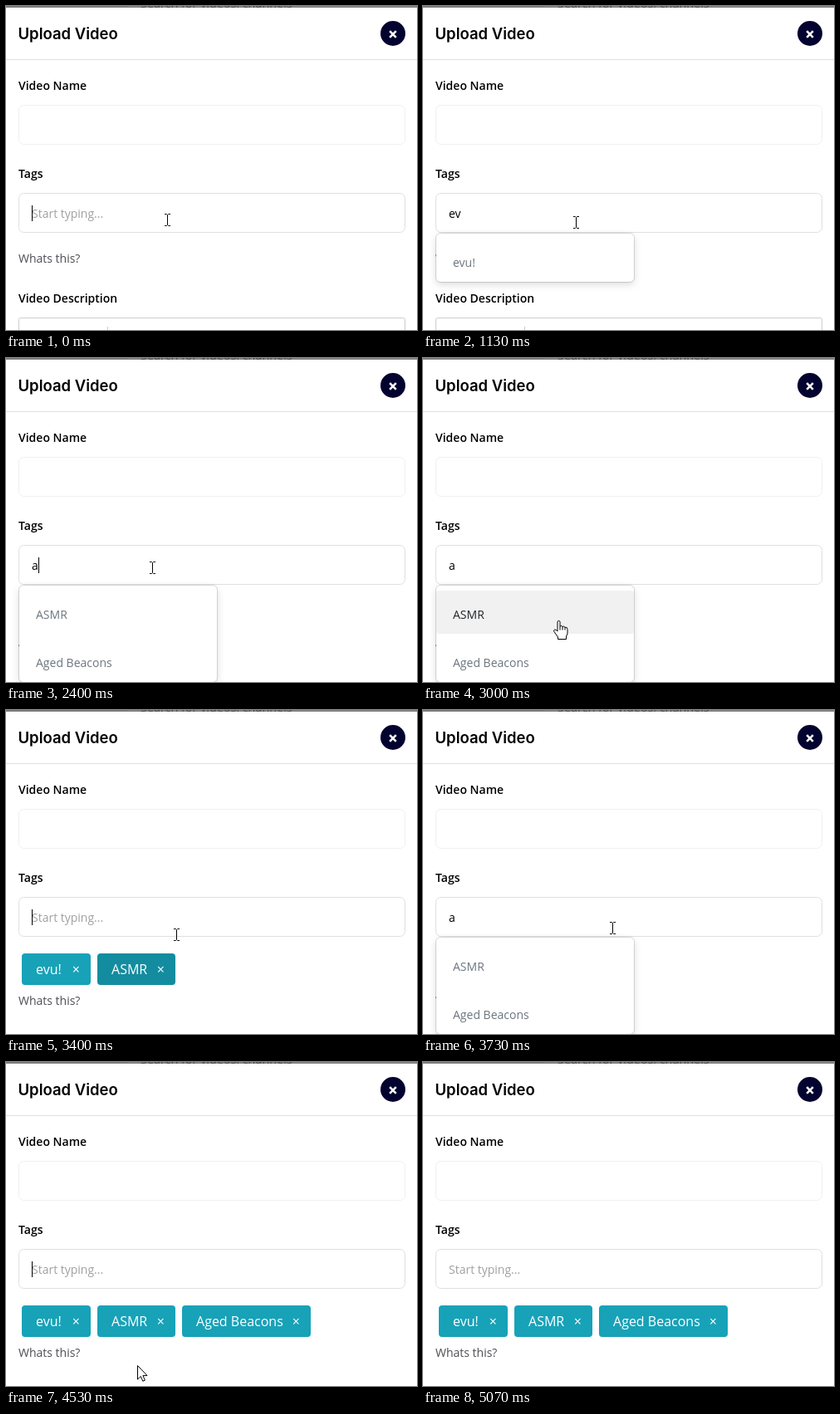
Recreate the animation shown at these times as an HTML page. Size 495x390 px, loop 5.27 s.

```html
<!DOCTYPE html>
<html lang="en">
<head>
<meta charset="utf-8">
<title>Upload Video</title>
<style>
  html, body { margin: 0; width: 100%; height: 100%; overflow: hidden; background: #fff; }
  svg { display: block; width: 495px; height: 390px; }
  text { font: 14px "Open Sans", "Noto Sans", sans-serif; white-space: pre; }
  .label { font-weight: 600; }
  .title { font: 600 18.5px Inter, sans-serif; }
  .search { font-size: 14.4px; fill: #4a4a4a; }
  .hint { fill: #a0a0a0; }
  .help { fill: #4f4f55; }
  .pill text { font-size: 16px; fill: #fff; }
  .box { fill: #fff; }
  .shadow { fill: #fff; filter: drop-shadow(0 3px 5px rgba(0, 0, 0, .15)); }
  .item text { fill: #6c757d; }
  .item rect { fill: none; }
  .item.hover text { fill: #212529; }
  .item.hover rect { fill: #f1f1f1; }
</style>
</head>
<body>
<svg viewBox="0 0 495 390">
  <rect width="495" height="390" fill="#fff"/>
  <rect width="495" height="2" fill="#7d7d7d"/>
  <rect x="147" width="348" height="1" fill="#868686"/>
  <text class="search" x="162" y="2">Search for videos, channels</text>
  <rect y="2" width="495" height="62" fill="#fff"/>
  <rect y="64" width="495" height="1" fill="#dee2e6"/>
  <text class="title" x="14.5" y="40">Upload Video</text>
  <circle cx="466" cy="33" r="15" fill="#03032f"/>
  <path d="M462.2 30.2l7.6 7.6m0-7.6l-7.6 7.6" stroke="#fff" stroke-width="2.6"/>

  <text class="label" x="15" y="101">Video Name</text>
  <rect class="box" x="15.5" y="119.5" width="465" height="47" rx="6" stroke="#f0f0f0"/>
  <text class="label" x="15" y="207">Tags</text>
  <rect class="box" x="15.5" y="225.5" width="465" height="47" rx="6" stroke="#dfdfdf"/>
  <text class="hint" id="hint" x="31" y="255">Start typing...</text>
  <text id="typed" x="31" y="255"></text>
  <rect id="caret" y="240" width="1" height="19"/>

  <g id="below">
    <text class="help" x="15" y="309">Whats this?</text>
    <text class="label" x="15" y="357">Video Description</text>
    <rect class="box" x="15.5" y="375.5" width="465" height="90" rx="2" stroke="#ccc"/>
    <rect x="122" y="386" width="1" height="20" fill="#ccc"/>
  </g>
  <g id="pills"></g>

  <g id="menu">
    <rect class="shadow" id="sheet" x="16" y="274" width="238" rx="5"/>
    <rect id="edge" x="15.5" y="273.5" width="239" rx="5.5" fill="none" stroke="#000" stroke-opacity=".13"/>
    <g id="items"></g>
  </g>

  <g id="cursor">
    <path id="beam" d="M-3.5-6.5H-1L0-5.5L1-6.5H3.5M0-5.5V6.5M-3.5 7.5H-1L0 6.5L1 7.5H3.5"
      transform="translate(.5 0)" fill="none" stroke="#000"/>
    <g id="hand" fill="#fff" stroke="#000" stroke-linejoin="round">
      <path d="M-2 1.8Q-2 .3-.5 .3T1 1.8V7Q3 5.5 4 7.5Q6 6.2 7 8.2Q10 7.5 10 10.5V15Q10 17 8.5 19V22.5H-1.5V20L-6 13.5Q-7.2 11.5-5.5 11T-2 13Z"/>
      <path d="M1 7V11.5M4 7.5V11.5M7 8.2V11.5" fill="none"/>
    </g>
    <path id="arrow" d="M.5 .5V17L4.3 13.4L6.8 19.2L9.4 18.1L6.9 12.4H12Z" fill="#fff" stroke="#000"/>
  </g>
</svg>
<script>
const LOOP = 5270, FPS = 15;
const $ = id => document.getElementById(id);
const clamp = v => Math.max(0, Math.min(1, v));

const TAGS = ['evu!', 'ASMR', 'Aged Beacons'];
const A_LIST = ['ASMR', 'Aged Beacons'];

// tick, typed text, suggestions, number of tags
const STATES = [
  [0, '', [], 0],
  [9, 'e', ['evu!', 'Education'], 0],
  [13, 'ev', ['evu!'], 0],
  [25, '', [], 1],
  [33, 'a', A_LIST, 1],
  [48, '', [], 2],
  [56, 'a', A_LIST, 2],
  [67, '', [], 3]
];
// ticks at which the caret turns on, off, on, ...
const BLINKS = [0, 6, 9, 17, 25, 41, 48, 56, 64, 76];
// tick, x, y of the pointer
const PATH = [
  [0, 194, 257], [16, 194, 257], [17, 184, 260], [20, 140, 296], [22, 112, 328],
  [24, 97, 312], [25, 97, 310], [28, 118, 290], [32, 172, 250], [36, 176, 252],
  [39, 176, 252], [45, 164, 316], [48, 160, 315], [51, 205, 270], [53, 228, 262],
  [56, 228, 262], [58, 200, 292], [60, 172, 325], [62, 161, 342], [65, 160, 356],
  [67, 160, 356], [72, 150, 400]
];
// x, width, tick the pointer enters, tick it leaves
const PILLS = [[19, 83, 25, 26.5], [110, 94, 48, 50.4], [212, 155, 99, 99]];

function add(parent, tag, attrs, text) {
  const el = document.createElementNS('http://www.w3.org/2000/svg', tag);
  for (const key in attrs) el.setAttribute(key, attrs[key]);
  if (text) el.textContent = text;
  return parent.appendChild(el);
}

const pills = PILLS.map(([x, width], i) => {
  const g = add($('pills'), 'g', { class: 'pill' });
  const rect = add(g, 'rect', { x, y: 293, width, height: 38, rx: 4 });
  add(g, 'text', { x: x + 17, y: 318 }, TAGS[i]);
  add(g, 'text', { x: x + width - 13, y: 318, 'text-anchor': 'end' }, '×');
  return { g, rect };
});

const items = [0, 1].map(i => {
  const g = add($('items'), 'g', { class: 'item' });
  add(g, 'rect', { x: 16, y: 280 + i * 58, width: 238, height: 52, rx: 3 });
  return { g, text: add(g, 'text', { x: 36, y: 314 + i * 58 }) };
});

function show(el, on) {
  el.style.display = on ? '' : 'none';
}

function pointAt(k) {
  const i = PATH.findIndex(p => p[0] > k);
  if (i < 0) return PATH[PATH.length - 1].slice(1);
  const [t0, x0, y0] = PATH[i - 1], [t1, x1, y1] = PATH[i];
  const f = (k - t0) / (t1 - t0);
  return [Math.round(x0 + (x1 - x0) * f), Math.round(y0 + (y1 - y0) * f)];
}

function pillColor(k, enter, leave) {
  const mix = clamp((k - enter + .6) * .45) - clamp((k - leave) * .45);
  const to = [19, 132, 150];
  const rgb = [23, 162, 184].map((c, i) => Math.round(c + (to[i] - c) * Math.max(0, mix)));
  return `rgb(${rgb})`;
}

function draw(k) {
  const [, typed, list, count] = STATES.filter(s => s[0] <= k).pop();
  const [x, y] = pointAt(k);

  $('typed').textContent = typed;
  show($('hint'), !typed);
  const end = typed ? Math.round($('typed').getComputedTextLength()) : 0;
  $('caret').setAttribute('x', 31 + end);
  show($('caret'), BLINKS.filter(b => b <= k).length % 2);

  $('below').setAttribute('transform', `translate(0 ${count ? 46 : 0})`);
  pills.forEach(({ g, rect }, i) => {
    show(g, i < count);
    rect.setAttribute('fill', pillColor(k, PILLS[i][2], PILLS[i][3]));
  });

  const open = list.length > 0;
  const height = list.length * 58 + 2;
  show($('menu'), open);
  $('sheet').setAttribute('height', Math.max(0, height - 2));
  $('edge').setAttribute('height', height - 1);
  items.forEach(({ g, text }, i) => {
    show(g, i < list.length);
    text.textContent = list[i] || '';
    const top = 280 + i * 58;
    g.classList.toggle('hover', y >= top && y < top + 58);
  });

  const onPill = !open && y >= 293 && y < 331 &&
    PILLS.slice(0, count).some(([px, w]) => x >= px && x < px + w);
  const inMenu = open && y > 273 && x < 255;
  const kind = onPill || inMenu ? 'hand' : y > 225 && y < 273 ? 'beam' : 'arrow';
  for (const id of ['beam', 'hand', 'arrow']) show($(id), id === kind);
  $('cursor').setAttribute('transform', `translate(${x} ${y})`);
}

function frame() {
  const t = performance.now() % LOOP;
  draw(Math.floor((t + 4) * FPS / 1000));
  requestAnimationFrame(frame);
}
frame();
</script>
</body>
</html>
```
